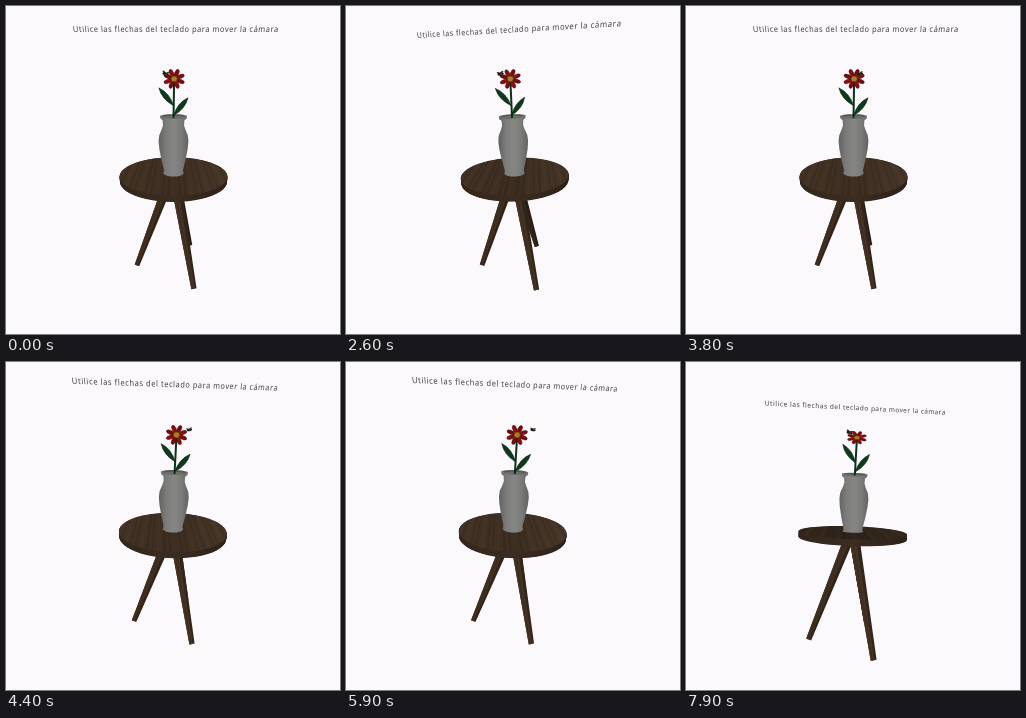
These frames come from a looping animation (334x328 px, 8 s). An HTML page with a canvas:

```html
<!DOCTYPE html>
<html lang="es">
<head>
<meta charset="utf-8">
<title>Florero</title>
<style>
  html, body { margin: 0; width: 100%; height: 100%; overflow: hidden; background: #fbf9fb; }
  canvas { display: block; width: 334px; height: 328px; }
</style>
</head>
<body>
<canvas id="stage" width="334" height="328"></canvas>
<script>
const ctx = document.getElementById('stage').getContext('2d');
const LOOP = 8000, STEP = 100, DIST = 260, TAU = Math.PI * 2;
const rad = deg => deg * Math.PI / 180;
const lerp = (a, b, k) => a + (b - a) * k;

// time, azimuth, elevation, roll (degrees)
const CAMERA = [
  [0, 0, 20, 0], [1900, 0, 20, 0], [2600, -5.5, 19.5, -2.4], [2850, -5.5, 19.5, -2.4],
  [3600, 0, 20, 0], [3900, 0, 20, 0], [4500, 3.4, 20.5, 1.8], [4900, 3.5, 23.8, 1.9],
  [5100, 3.5, 24.6, 1.9], [5350, 3.5, 24.3, 1.9], [5900, 3.4, 20.4, 1.9],
  [6900, 3.2, 14, 1.9], [7900, 3, 5.6, 1.9], [8000, 3, 4.8, 1.9]
];
// height, radius
const VASE = [
  [-6.7, 10.6], [-5, 9.9], [-2, 10.2], [8, 12.4], [19, 14.3], [27, 14.9], [33, 14.2],
  [39, 11.6], [43, 10.3], [48, 10.6], [49.5, 12.8], [52, 13]
];
const AXIS = { x: 0.5, z: -9.6 };
const TABLE = { y: -6.7, r: 55.2, thick: 5.6 };
const MESSAGE = 'Utilice las flechas del teclado para mover la cámara';
const FONT = '40px "Noto Sans", "Open Sans", sans-serif';

let cam;

function sample(table, t) {
  let i = 1;
  while (i < table.length - 1 && table[i][0] < t) i++;
  const a = table[i - 1], b = table[i];
  const k = (t - a[0]) / (b[0] - a[0]);
  return a.slice(1).map((v, n) => lerp(v, b[n + 1], k));
}

function setCamera(t) {
  const [az, el, roll] = sample(CAMERA, t);
  const trig = d => [Math.sin(rad(d)), Math.cos(rad(d))];
  cam = { az: trig(az), el: trig(el), roll: trig(roll), angle: rad(roll), light: (el - 6) / 18 };
}

function project(x, y, z) {
  const [sa, ca] = cam.az, [se, ce] = cam.el, [sr, cr] = cam.roll;
  const px = x * ca + z * sa, pz = z * ca - x * sa;
  const s = DIST / (DIST - pz * ce - y * se);
  const u = px * s, v = (y * ce - pz * se) * s;
  return { x: 167 + u * cr + v * sr, y: 164 - v * cr + u * sr, s };
}

function fill(points, color) {
  ctx.beginPath();
  points.forEach(p => ctx.lineTo(p.x, p.y));
  ctx.closePath();
  ctx.fillStyle = color;
  ctx.fill();
}

function ring(y, r) {
  return Array.from({ length: 56 }, (_, i) => {
    const a = i / 56 * TAU;
    return project(AXIS.x + r * Math.cos(a), y, AXIS.z + r * Math.sin(a));
  });
}

function across(p, half, ...colors) {
  const g = ctx.createLinearGradient(p.x - half, 0, p.x + half, 0);
  colors.forEach((c, i) => g.addColorStop(i / (colors.length - 1), c));
  return g;
}

function shade(r, g, b, k) {
  return `rgb(${[r, g, b].map(v => Math.round(v * k)).join()})`;
}

function drawText() {
  ctx.font = FONT;
  ctx.letterSpacing = '3px';
  ctx.fillStyle = '#414147';
  const size = 214 / ctx.measureText(MESSAGE).width;
  [...MESSAGE].forEach((ch, i) => {
    const x = -104 + ctx.measureText(MESSAGE.slice(0, i)).width * size;
    const o = project(x, 131.6, -60);
    const r = project(x + 4, 131.6, -60), u = project(x, 135.6, -60);
    const k = size / 4;
    ctx.setTransform((r.x - o.x) * k, (r.y - o.y) * k, (o.x - u.x) * k, (o.y - u.y) * k, o.x, o.y);
    ctx.fillText(ch, 0, 0);
  });
  ctx.resetTransform();
}

function drawLeg(deg, k) {
  const sx = Math.sin(rad(deg)), sz = Math.cos(rad(deg));
  const at = r => project(AXIS.x + r * sx, r < 10 ? -12 : -124, AXIS.z + r * sz);
  const top = at(3), foot = at(43.5);
  const len = Math.hypot(foot.x - top.x, foot.y - top.y);
  const nx = (foot.y - top.y) / len, ny = (top.x - foot.x) / len;
  const edge = (p, w) => ({ x: p.x + nx * w * p.s, y: p.y + ny * w * p.s });
  const strip = (a, b, color) =>
    fill([edge(top, 5.2 * a), edge(top, 5.2 * b), edge(foot, 2.8 * b), edge(foot, 2.8 * a)], color);
  strip(-1, 1, shade(50, 37, 25, k));
  strip(-1, 0.3, shade(68, 51, 35, k));
  strip(-0.55, -0.3, shade(60, 44, 30, k));
}

function drawTable() {
  drawLeg(149, 0.75);
  drawLeg(-88, 0.95);
  drawLeg(30, 1);
  const c = project(AXIS.x, TABLE.y, AXIS.z);
  const side = across(c, 55, '#32261b', '#3b2c20', '#2d2118');
  for (let d = TABLE.thick; d >= 0; d -= 0.4) fill(ring(TABLE.y - d, TABLE.r), side);

  const k = lerp(0.78, 1.08, cam.light);
  fill(ring(TABLE.y, TABLE.r),
    across(c, 55, shade(66, 50, 37, k), shade(60, 45, 33, k), shade(70, 54, 40, k)));
  ctx.save();
  ctx.clip();
  for (let i = -11; i <= 11; i++) {
    const x = i * 5, w = 1 + 1.4 * Math.abs(Math.sin(i * 2.3));
    fill([project(x, TABLE.y, -66), project(x + w, TABLE.y, -66),
      project(x + w, TABLE.y, 47), project(x, TABLE.y, 47)],
      i % 3 ? 'rgba(20,12,8,.13)' : 'rgba(105,80,58,.1)');
  }
  ctx.restore();
}

function drawVase() {
  const [low, lowR] = VASE[0], [high, highR] = VASE[VASE.length - 1];
  const [sr, cr] = cam.roll;
  const left = [], right = [];
  for (let i = 0; i <= 60; i++) {
    const y = lerp(low, high, i / 60);
    const [r] = sample(VASE, y);
    const c = project(AXIS.x, y, AXIS.z), w = r * c.s;
    left.push({ x: c.x - w * cr, y: c.y - w * sr });
    right.unshift({ x: c.x + w * cr, y: c.y + w * sr });
  }
  const body = across(project(AXIS.x, 22, AXIS.z), 15,
    '#606060', '#7c7c7b', '#868685', '#7b7b7a', '#626262');
  fill(ring(low, lowR), body);
  fill([...left, ...right], body);
  fill(ring(high, highR), '#7f7f7e');
  fill(ring(high, 11.4), '#565655');
  fill(ring(high - 1.2, 10.1), '#6d6d6c');
}

function drawLeaf(x, y, tipX, tipY) {
  const a = project(x, y, -3), b = project(tipX, tipY, 3);
  const dx = b.x - a.x, dy = b.y - a.y;
  const side = w => [a.x + dx * 0.55 - dy * w, a.y + dy * 0.55 + dx * w];
  ctx.beginPath();
  ctx.moveTo(a.x, a.y);
  ctx.quadraticCurveTo(...side(0.22), b.x, b.y);
  ctx.quadraticCurveTo(...side(-0.22), a.x, a.y);
  ctx.fillStyle = '#0d3a1d';
  ctx.fill();
  ctx.lineWidth = 0.6;
  ctx.strokeStyle = '#08210f';
  ctx.stroke();
}

function drawFlower() {
  const base = project(0.5, 50.5, -7), mid = project(0.8, 68, -3), bloom = project(1, 86, 0);
  ctx.beginPath();
  ctx.moveTo(base.x, base.y);
  ctx.quadraticCurveTo(mid.x, mid.y, bloom.x, bloom.y);
  ctx.lineWidth = 2;
  ctx.strokeStyle = '#0c3319';
  ctx.stroke();
  drawLeaf(0.5, 62.5, -12.5, 78.5);
  drawLeaf(0.5, 53.5, 13.5, 70);

  ctx.save();
  ctx.translate(bloom.x, bloom.y);
  ctx.rotate(cam.angle);
  ctx.scale(bloom.s, bloom.s * lerp(0.68, 1, cam.light));
  for (let i = 0; i < 8; i++) {
    ctx.save();
    ctx.rotate((i + 0.5) * TAU / 8);
    ctx.beginPath();
    ctx.ellipse(5.9, 0, 3.8, 1.8, 0, 0, TAU);
    ctx.fillStyle = i % 2 ? '#8c0d11' : '#790a0e';
    ctx.fill();
    ctx.lineWidth = 0.4;
    ctx.strokeStyle = '#3a0608';
    ctx.stroke();
    ctx.restore();
  }
  ctx.beginPath();
  ctx.arc(0, 0, 2.8, 0, TAU);
  ctx.fillStyle = '#a8801c';
  ctx.fill();
  ctx.lineWidth = 0.7;
  ctx.strokeStyle = '#5f3d0c';
  ctx.stroke();
  ctx.restore();
  return bloom;
}

function drawBee(t, bloom) {
  const phase = (t - 5350) / LOOP * TAU;
  const size = lerp(0.85, 1.1, (1 - Math.cos(phase)) / 2);
  const blob = (x, y, rx, ry, turn, color) => {
    ctx.beginPath();
    ctx.ellipse(x, y, rx, ry, turn, 0, TAU);
    ctx.fillStyle = color;
    ctx.fill();
  };
  ctx.save();
  ctx.translate(bloom.x + 17.5 * Math.cos(phase), bloom.y - 5.2);
  ctx.rotate(0.3 * Math.sin(phase));
  ctx.scale(size, size);
  blob(-1.6, -1, 2, 0.9, 0.5, '#20351f');
  blob(1.4, -1.1, 1.9, 0.8, -0.4, '#20351f');
  blob(0, 0.3, 3.1, 1.3, 0, '#161a0e');
  blob(0.5, 0.4, 0.7, 0.9, 0, '#5a4b14');
  ctx.restore();
}

function draw(t) {
  setCamera(t);
  ctx.fillStyle = '#fbf9fb';
  ctx.fillRect(0, 0, 334, 328);
  drawText();
  drawTable();
  drawVase();
  drawBee(t, drawFlower());
}

const start = performance.now();
let last = -1;
function tick() {
  const t = Math.floor((performance.now() - start) % LOOP / STEP) * STEP;
  if (t !== last) draw(last = t);
  requestAnimationFrame(tick);
}
tick();
</script>
</body>
</html>
```
